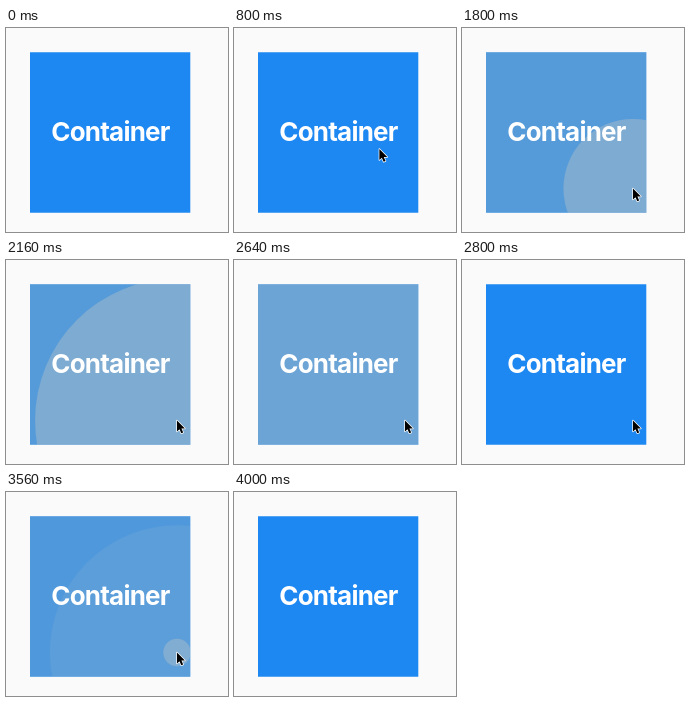
Recreate the animation shown at these times as an HTML page. Size 222 px wide and 204 px high, loop 4600 ms.

```html
<!DOCTYPE html>
<html lang="en">
<head>
<meta charset="utf-8">
<title>Ink ripple</title>
<style>
  html, body { margin: 0; width: 100%; height: 100%; overflow: hidden; background: #fafafa; }
  svg { display: block; }
  text { font: 700 26px Inter, "Liberation Sans", sans-serif; letter-spacing: -0.8px; fill: #fff; text-anchor: middle; }
</style>
</head>
<body>
<svg width="222" height="204" viewBox="0 0 222 204">
  <clipPath id="box"><rect x="24" y="24.2" width="160.3" height="160.6"/></clipPath>
  <g clip-path="url(#box)">
    <rect width="222" height="204" fill="#1e88f2"/>
    <rect id="glow" width="222" height="204" fill="#bcbcaa"/>
    <g id="ink" fill="#c8c8c2"></g>
  </g>
  <text x="104.4" y="113.4">Container</text>
  <path id="cursor" d="M0 0V11L2.5 8.7 4.3 12.8 6.2 12 4.4 8H7.9Z" stroke="#fff"
        stroke-width="1.4" stroke-linejoin="round" paint-order="stroke"/>
</svg>
<script>
const LOOP = 4600, STEP = 40;
const ALPHA = 0.35, FADE = 200;
const RADIUS = 201, SLOW = 0.201, FAST = 0.74; // px, px/ms while held, px/ms once released
const REST = [171, 160.5];

const clamp = (v, lo = 0, hi = 1) => Math.min(hi, Math.max(lo, v));
const set = (el, attrs) => Object.entries(attrs).forEach(([k, v]) => el.setAttribute(k, v));
const glow = document.getElementById("glow");
const ink = document.getElementById("ink");
const cursor = document.getElementById("cursor");

// Evenly spaced presses of equal length
const burst = (first, count, gap, hold) =>
  Array.from({ length: count }, (_, i) => ({ down: first + i * gap, up: first + i * gap + hold }));

const taps = [
  ...burst(1010, 2, 222, 110),
  ...burst(1454, 1, 0, 1146),
  ...burst(2800, 1, 0, 70),
  ...burst(2940, 4, 184, 110),
];

for (const tap of taps) {
  tap.circle = document.createElementNS("http://www.w3.org/2000/svg", "circle");
  set(tap.circle, { cx: REST[0], cy: REST[1] });
  ink.append(tap.circle);
}

// Rises while pressed and falls back between presses
function glowLevel(t) {
  let level = 0, last = 0;
  for (const { down, up } of taps) {
    if (t < down) break;
    level = clamp(level - (down - last) / FADE);
    level = clamp(level + (Math.min(t, up) - down) / FADE);
    last = up;
  }
  return clamp(level - Math.max(0, t - last) / FADE);
}

function drawSplash({ down, up, circle }, t) {
  const held = clamp(t - down, 0, up - down);
  const since = Math.max(0, t - up);
  set(circle, {
    r: Math.min(RADIUS, held * SLOW + since * FAST),
    opacity: t < down ? 0 : ALPHA * clamp(1 - since / FADE),
  });
}

const bezier = (a, b, c, s) =>
  a.map((v, i) => v * (1 - s) ** 2 + 2 * b[i] * s * (1 - s) + c[i] * s * s);

function cursorAt(t) {
  const enter = clamp((t - 360) / 640);
  const leave = clamp((t - 3600) / 400);
  return leave > 0
    ? bezier(REST, [174, 230], [160, -18], leave ** 1.4)
    : bezier([49, 196], [95, 20], REST, 1 - (1 - enter) ** 1.5);
}

function draw(t) {
  set(glow, { opacity: glowLevel(t) * ALPHA });
  taps.forEach(tap => drawSplash(tap, t));
  set(cursor, {
    transform: `translate(${cursorAt(t)})`,
    visibility: t >= 360 && t < 4000 ? "visible" : "hidden",
  });
}

const start = performance.now();
function tick() {
  const t = (performance.now() - start + 4) % LOOP;
  draw(Math.floor(t / STEP) * STEP);
  requestAnimationFrame(tick);
}
tick();
</script>
</body>
</html>
```
